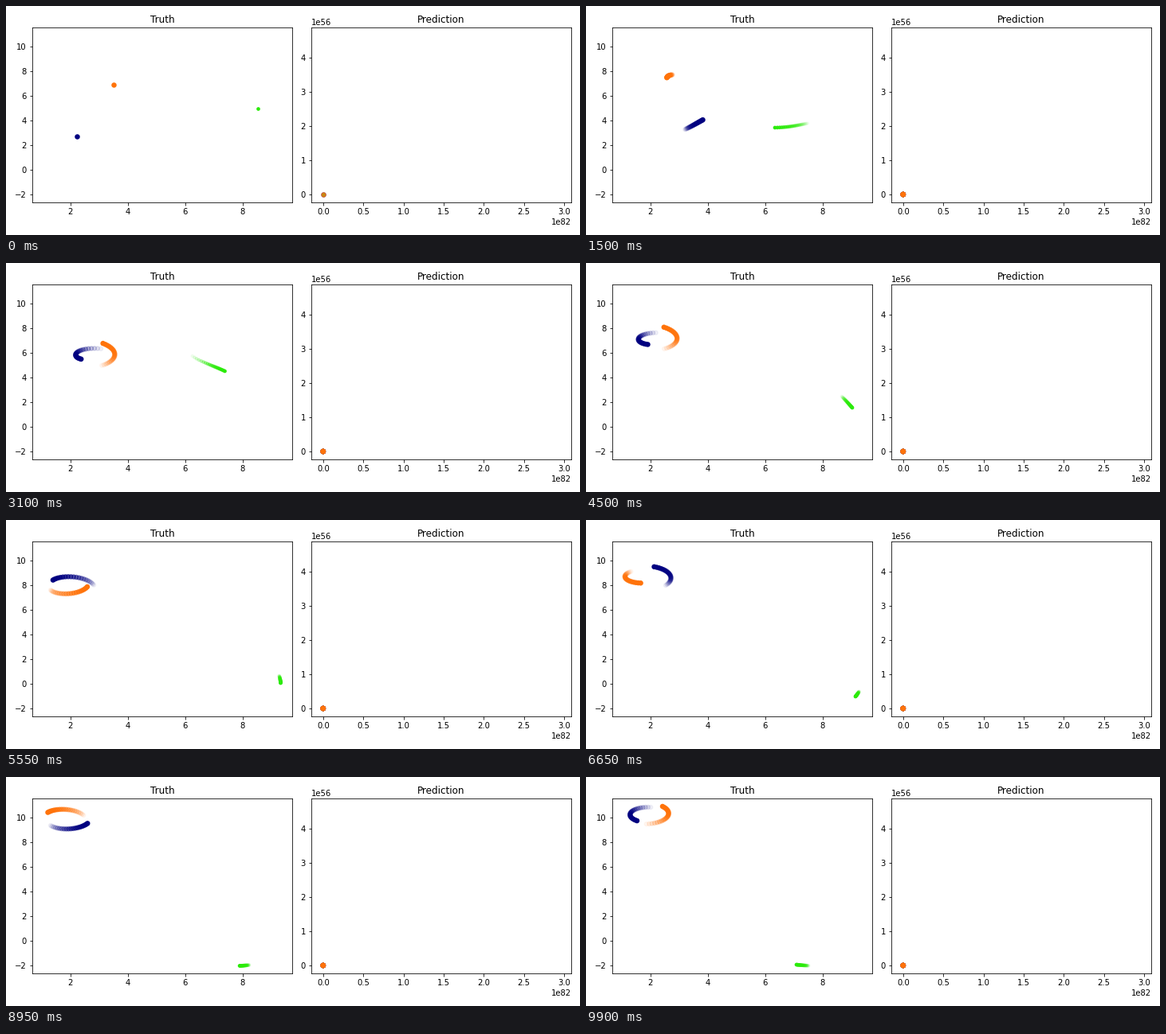
Animation of 720 by 288 pixels, one loop 9950 ms. Source, as a matplotlib script:

```python
import numpy as np
import matplotlib.pyplot as plt
from matplotlib.animation import FuncAnimation

W, H, DPI = 720, 288, 72
FRAMES, INTERVAL = 199, 50
SUBSTEPS, TRAIL = 2, 20               # simulation steps per frame, steps in a trail
SCALE = np.array([36.08, -15.5])      # pixels per data unit
ORIGIN = np.array([8.34, 206.0])      # pixel position of data (0, 0)
MASS_RATIO = 0.236                    # light body relative to the heavy pair

NAVY, GREEN, ORANGE = (0, 0, 0.5), (0.17, 0.92, 0.04), (1, 0.45, 0.04)
BODIES = [(NAVY, 25), (GREEN, 10), (ORANGE, 25)]     # colour, marker area

# Light body: falls in, swings round the pair, drifts out and back (time, x, y)
LIGHT = [
    (0, 316, 128.7), (21, 276, 148), (30, 237, 153), (37, 184, 151.8),
    (42, 136, 137.7), (45, 115, 121), (47, 161, 102), (50, 213, 108.5),
    (54, 242, 122), (62, 274.5, 136), (90, 334, 182), (112, 344.6, 206),
    (133, 338, 222), (160, 316, 234.3), (198, 264, 236)]

# Heavy pair: separation before it becomes bound (time, dx, dy)
INFALL = [(0, -1.27, -4.19), (21, 0.47, -4.4), (30, 1.25, -3.42),
          (38, 1.91, -1.85), (42, 1.96, -0.98)]
CAPTURE = 45


def spline(keys, t):
    """Cubic Hermite curve through rows of (time, x, y)."""
    keys = np.asarray(keys, float)
    times, pts = keys[:, 0], keys[:, 1:]
    slopes = np.gradient(pts, times, axis=0, edge_order=2)
    i = np.clip(np.searchsorted(times, t, side="right") - 1, 0, len(times) - 2)
    h = (times[i + 1] - times[i])[:, None]
    u = (t - times[i])[:, None] / h
    return ((1 + 2 * u) * (1 - u) ** 2 * pts[i] + u * (1 - u) ** 2 * h * slopes[i]
            + u * u * (3 - 2 * u) * pts[i + 1] + u * u * (u - 1) * h * slopes[i + 1])


def orbit(t, a=1.475, e=0.114, periapsis=np.radians(140), period=27.3, t0=55.48):
    """Separation of the bound pair on a Kepler ellipse."""
    m = 2 * np.pi * (t - t0) / period
    nu = m + 2 * e * np.sin(m) + 1.25 * e * e * np.sin(2 * m)
    r = a * (1 - e * e) / (1 + e * np.cos(nu))
    return np.stack([r * np.cos(nu + periapsis), r * np.sin(nu + periapsis)], axis=-1)


def truth_paths(t):
    light = spline(LIGHT, t)
    joined = INFALL + [(k, *orbit(k)) for k in (CAPTURE, CAPTURE + 2)]
    early = t < CAPTURE
    gap = orbit(t)
    gap[early] = spline(joined, t[early])
    # The common centre of mass drifts uniformly
    centre = np.array([150.95, 131.0]) + t[:, None] * np.array([-0.181, -0.246])
    pair = (1 + MASS_RATIO) * centre - MASS_RATIO * light
    half = gap * SCALE / 2
    return [(p - ORIGIN) / SCALE for p in (pair + half, light, pair - half)]


def prediction_paths(t, peak):
    """Everything stays near zero until the light body blows up."""
    paths = [np.zeros((len(t), 2)) for _ in BODIES]
    blowup = 140 * SUBSTEPS
    paths[1][blowup] = 0, peak[1]
    paths[1][blowup + 1] = peak[0], 0
    paths[1][blowup + 2:] = np.nan
    return paths


def add_panel(left, title, xlim, ylim):
    ax = fig.add_axes([left / W, 41 / H, 326 / W, 220 / H])
    ax.set_title(title)
    ax.set_xlim(*xlim)
    ax.set_ylim(*ylim)
    dots = [ax.scatter([0], [0], s=s, color=[c], linewidths=1.5, edgecolors="face")
            for c, s in BODIES]
    return ax, dots


fig = plt.figure(figsize=(W / DPI, H / DPI), dpi=DPI, facecolor="white")
truth_ax, truth_dots = add_panel(33, "Truth", (0.683, 9.719), (-2.645, 11.548))
truth_ax.set_xticks(range(2, 9, 2))
truth_ax.set_yticks(range(-2, 11, 2))

peak = np.array([2.943e82, 4.66e56])
margins = np.outer(peak, (-0.05, 1.05))
pred_ax, pred_dots = add_panel(383, "Prediction", *margins)
pred_ax.set_xticks(np.arange(7) * 0.5e82)
pred_ax.set_yticks(np.arange(5) * 1e56)

steps = np.arange((FRAMES - 1) * SUBSTEPS + 1) / SUBSTEPS
PANELS = [(truth_dots, truth_paths(steps), 1.0),
          (pred_dots, prediction_paths(steps, peak), 0.68)]


def draw(frame):
    head = frame * SUBSTEPS
    start = max(0, head - TRAIL + 1)
    fade = 1 - (head - np.arange(start, head + 1)) / TRAIL
    for dots, paths, opacity in PANELS:
        for dot, path, (color, _) in zip(dots, paths, BODIES):
            pts = path[start:head + 1]
            shown = np.isfinite(pts).all(axis=1)
            rgba = np.empty((len(pts), 4))
            rgba[:, :3] = color
            rgba[:, 3] = fade * opacity * shown
            dot.set_offsets(np.nan_to_num(pts))
            dot.set_facecolors(rgba)
    return truth_dots + pred_dots


anim = FuncAnimation(fig, draw, frames=FRAMES, interval=INTERVAL,
                     repeat=True, repeat_delay=0, blit=False)
plt.show()
```
